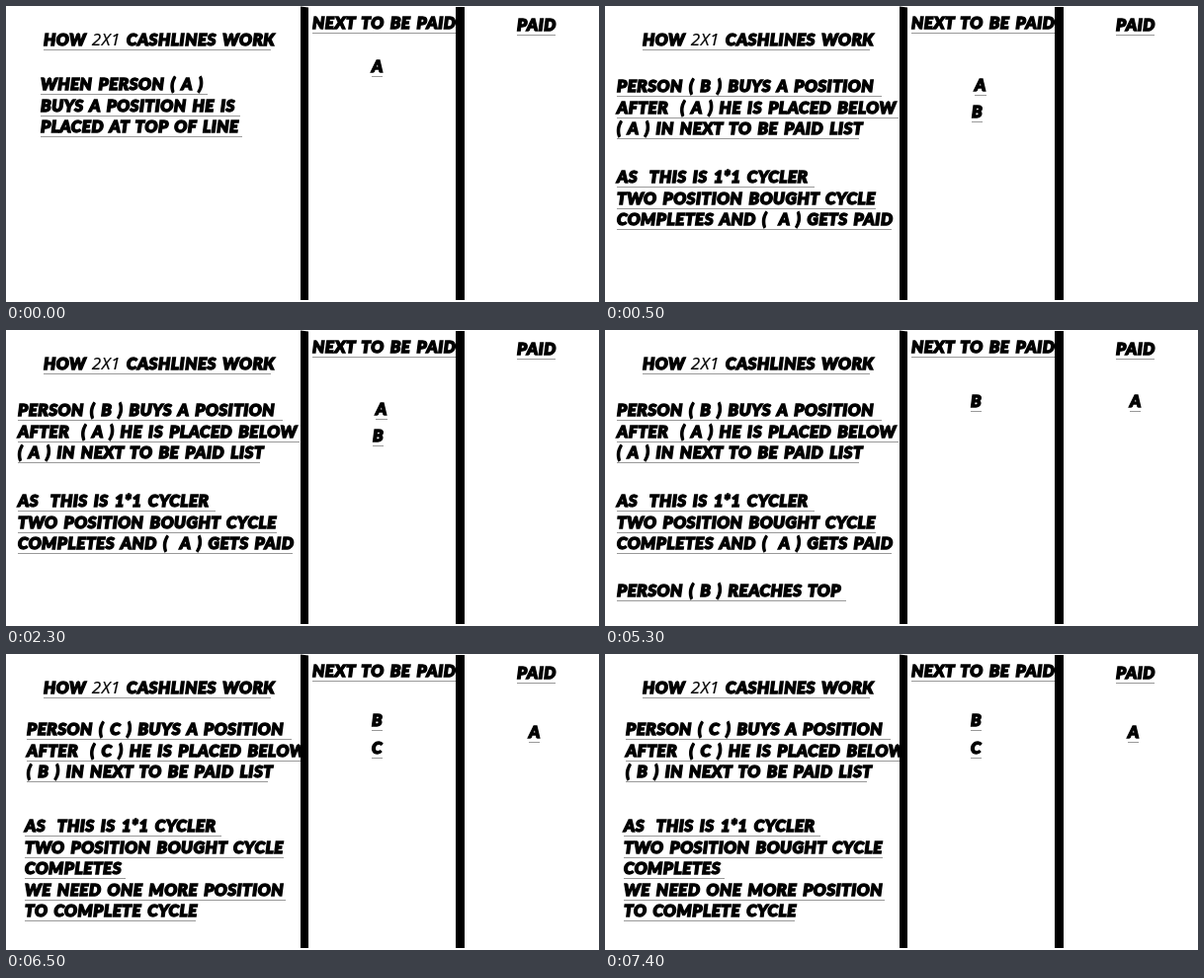
Recreate the animation shown at these times as an HTML page. Size 600x300 px, loop 8000 ms.

```html
<!DOCTYPE html>
<html lang="en">
<head>
<meta charset="utf-8">
<title>How 2x1 cashlines work</title>
<style>
html, body { margin: 0; width: 100%; height: 100%; overflow: hidden; background: #fff; }
svg { display: block; width: 600px; height: 300px; }
text {
  font: italic 900 17px Lato, sans-serif;
  letter-spacing: .5px; word-spacing: 2.1px; white-space: pre;
  stroke: #000; stroke-width: 1.3px;
}
.thin { font: italic 400 17px "Open Sans", sans-serif; stroke-width: .2px; }
line { stroke: #999; stroke-width: 1px; }
</style>
</head>
<body>
<svg viewBox="0 0 600 300">
  <g id="heads"></g>
  <g id="scenes"></g>
  <path d="M298 .5L306 1.5V298H298ZM455 1H464V298H455Z"/>
</svg>
<script>
const NS = 'http://www.w3.org/2000/svg';
const LOOP = 8000;

// Each line: text, left edge, baseline, right end of the rule
const heads = [
  ['HOW <tspan class="thin">2X1</tspan> CASHLINES WORK', 38, 40, 268],
  ['NEXT TO BE PAID', 310, 23, 455],
  ['PAID', 517, 25, 556]
];
const rules = [
  ['PERSON ( B ) BUYS A POSITION', 12, 87, 280],
  ['AFTER  ( A ) HE IS PLACED BELOW', 12, 109, 297],
  ['( A ) IN NEXT TO BE PAID LIST', 12, 130, 257],
  ['AS  THIS IS 1*1 CYCLER', 12, 179, 212],
  ['TWO POSITION BOUGHT CYCLE', 12, 201, 274],
  ['COMPLETES AND (  A ) GETS PAID', 12, 222, 290]
];
const scenes = [
  { at: 0, lines: [
    ['WHEN PERSON ( A )', 35, 85, 204],
    ['BUYS A POSITION HE IS', 35, 107, 237],
    ['PLACED AT TOP OF LINE', 35, 128, 239],
    ['A', 370, 67, 381]
  ] },
  { at: 500, lines: [...rules,
    ['A', 374, 86, 386],
    ['B', 371, 113, 382]
  ] },
  { at: 3500, lines: [...rules,
    ['PERSON ( B ) REACHES TOP', 12, 270, 244],
    ['B', 370, 78, 381],
    ['A', 531, 78, 542]
  ] },
  { at: 6500, lines: [
    ['PERSON ( C ) BUYS A POSITION', 21, 82, 289],
    ['AFTER  ( C ) HE IS PLACED BELOW', 21, 104, 300],
    ['( B ) IN NEXT TO BE PAID LIST', 21, 125, 265],
    ['AS  THIS IS 1*1 CYCLER', 19, 180, 218],
    ['TWO POSITION BOUGHT CYCLE', 19, 202, 281],
    ['COMPLETES', 19, 223, 121],
    ['WE NEED ONE MORE POSITION', 19, 245, 283],
    ['TO COMPLETE CYCLE', 19, 266, 192],
    ['B', 370, 73, 381],
    ['C', 370, 101, 381],
    ['A', 529, 85, 540]
  ] }
];

const markup = lines => lines.map(([text, x, y, end]) =>
  `<text x="${x}" y="${y}">${text}</text>` +
  `<line x1="${x}" x2="${end}" y1="${y + 4.5}" y2="${y + 4.5}"/>`).join('');

document.getElementById('heads').innerHTML = markup(heads);
const groups = scenes.map(scene => {
  const g = document.createElementNS(NS, 'g');
  g.innerHTML = markup(scene.lines);
  return document.getElementById('scenes').appendChild(g);
});

function draw() {
  const t = performance.now() % LOOP;
  const now = scenes.findLastIndex(scene => t >= scene.at);
  groups.forEach((g, i) => g.setAttribute('visibility', i === now ? 'visible' : 'hidden'));
  requestAnimationFrame(draw);
}
draw();
</script>
</body>
</html>
```
